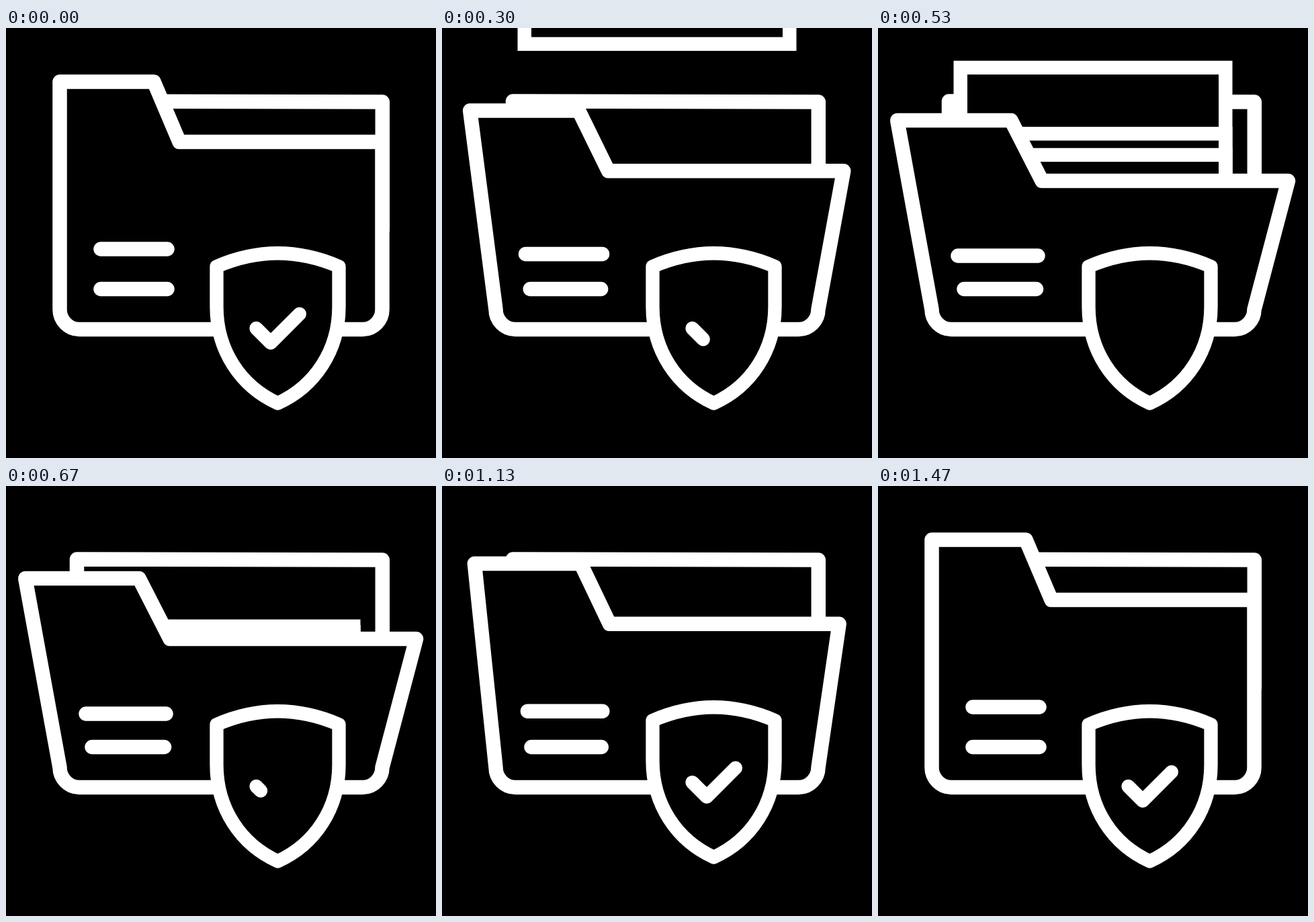
Animation, 640 px wide and 640 px high, one loop 1670 ms. Source, as an HTML page with a canvas:

```html
<!DOCTYPE html>
<html lang="en">
<head>
<meta charset="utf-8">
<title>Secure folder</title>
<style>
  html, body { margin: 0; height: 100%; overflow: hidden; background: #000; }
  canvas { display: block; }
</style>
</head>
<body>
<canvas id="stage" width="640" height="640"></canvas>
<script>
const ctx = document.getElementById('stage').getContext('2d');
const LOOP = 1670, FPS = 30;

const progress = (f, start, length) => Math.min(1, Math.max(0, (f - start) / length));
const ramp = (f, start, length) => {
  const u = progress(f, start, length);
  return u * u * (3 - 2 * u);
};
const mix = (a, b, p) => a + (b - a) * p;

function shape(path, filled = true) {
  const p = new Path2D(path);
  if (filled) ctx.fill(p);
  ctx.stroke(p);
}

function drawBack() {
  shape('M105.5 300V109L560.3 110V300');
}

// Three sheets drop in one after another; their outlines show through each other.
function drawSheets(f) {
  const height = 220, pen = 20.5;
  const tops = [0, 1, 3].map(delay => {
    const fall = progress(f - delay, 4.9, 7.1);
    const brake = progress(f - delay, 12, 6.2);
    return -50 + 252 * fall ** 2 + 225 * (1 - (1 - brake) ** 2) - height;
  });
  ctx.save();
  ctx.lineWidth = pen;
  ctx.lineJoin = 'miter';
  const box = y => [112.5 + pen / 2, y + pen / 2, 415 - pen, height - pen];
  tops.forEach(y => ctx.fillRect(...box(y)));
  tops.forEach(y => ctx.strokeRect(...box(y)));
  ctx.restore();
}

function drawFront(open) {
  const at = (a, b) => mix(a, b, open);
  const left = at(80, 28.7), top = at(80, 137.5);
  const right = at(560, 610.5), ledge = at(169.5, 227.5);
  shape(`M${left} ${top}H${at(220, 198)}L${at(258, 244)} ${ledge}H${right}L560 419
    C560 435 547 448.5 531 448.5H109C93 448.5 80 435 80 419Z`);
  const upper = at(329, 339);
  shape(`M${at(141, 119)} ${upper}H${at(240, 238)}
    M${at(141, 128)} 388.5H${at(240, 235.5)}`, false);
}

function drawShield(f, open) {
  let dy = 51 * ramp(f, 20, 8.9);
  if (f > 30) dy = mix(51, -25, ramp(f, 30.58, 5.08));
  if (f > 35.66) dy = -25 * (1 - ramp(f, 35.66, 8.34));

  ctx.save();
  ctx.translate(0, dy);
  ctx.lineWidth = 20.3;
  shape(`M313.5 355Q404.5 315.5 495.5 355V415C495.5 480 459.5 533.5 404.5 558.5
    C349.5 533.5 313.5 480 313.5 415Z`);

  const drawn = f < 15 ? 1 - open : ramp(f, 18, 10.1);
  if (drawn > 0.01) {
    const length = 91;
    ctx.setLineDash([length * drawn, 2 * length]);
    shape('M372.5 447L394 468.5L437 425.5', false);
  }
  ctx.restore();
}

function render(now) {
  const f = Math.floor((now % LOOP) * FPS / 1000 + 0.15);
  const open = ramp(f, 0, 13.4) - ramp(f, 28.35, 13.4);
  ctx.fillStyle = '#000';
  ctx.strokeStyle = '#fff';
  ctx.lineWidth = 21.5;
  ctx.lineCap = ctx.lineJoin = 'round';
  ctx.fillRect(0, 0, 640, 640);
  drawBack();
  drawSheets(f);
  drawFront(open);
  drawShield(f, open);
}

const start = performance.now();
(function tick() {
  render(performance.now() - start);
  requestAnimationFrame(tick);
})();
</script>
</body>
</html>
```
